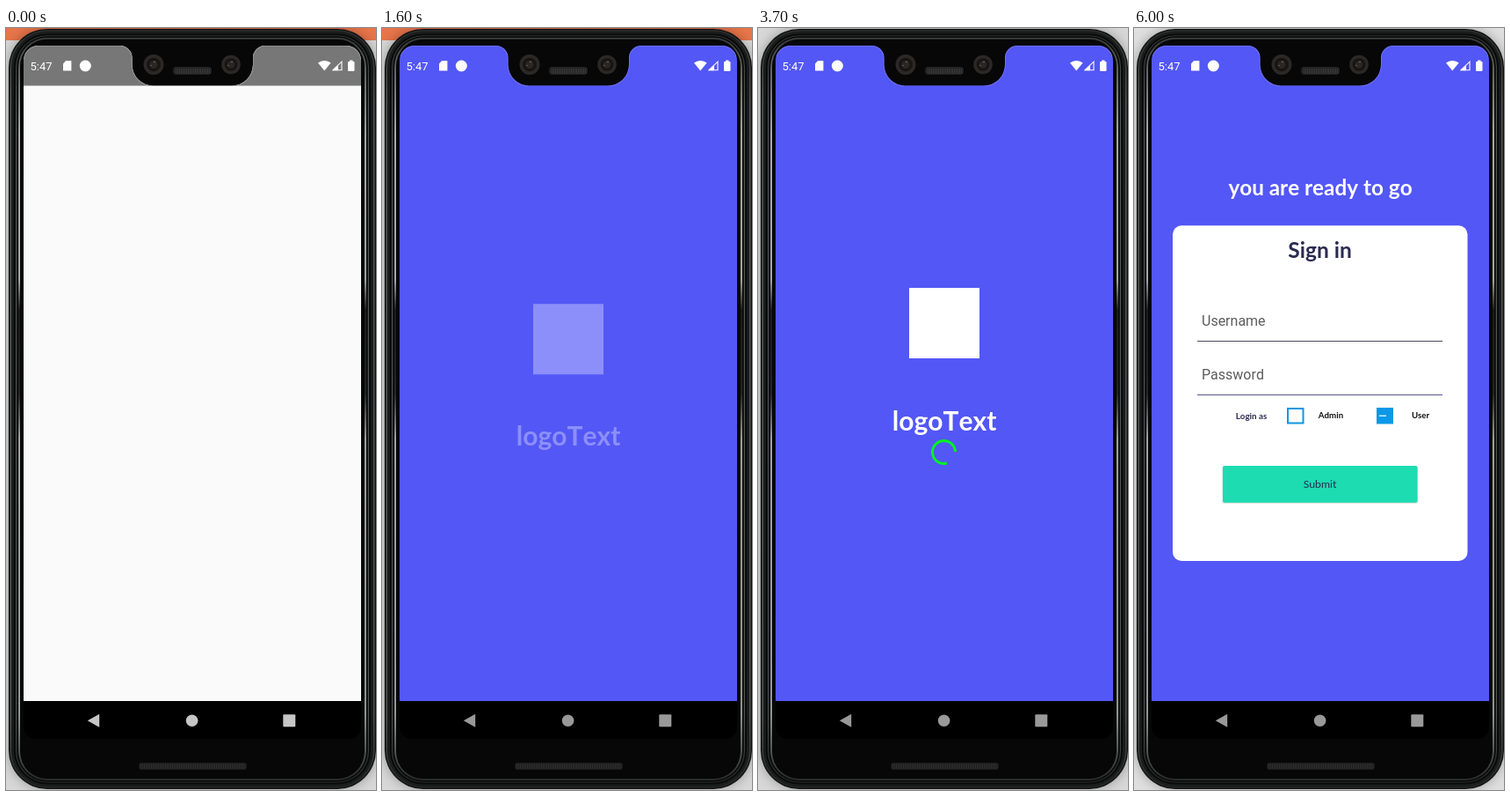
An HTML page with a canvas for the animation above (6300 ms loop, 421x865 px).

```html
<!DOCTYPE html>
<html lang="en">
<head>
<meta charset="utf-8">
<title>Splash to sign in</title>
<style>
  html, body { margin: 0; width: 100%; height: 100%; overflow: hidden; background: #d8d8d8; }
  canvas { display: block; width: 421px; height: 865px; }
</style>
</head>
<body>
<canvas id="stage"></canvas>
<script>
const W = 421, H = 865, LOOP = 6300;
const BLUE = '#5357f5', INK = '#2b2b52', SKY = '#0c98e6';
const GEO = 'Lato, sans-serif', ROBOTO = 'Roboto, sans-serif';

const canvas = document.getElementById('stage');
const ratio = window.devicePixelRatio || 1;
canvas.width = W * ratio;
canvas.height = H * ratio;
const c = canvas.getContext('2d');
c.scale(ratio, ratio);
c.fontKerning = 'none';

const clamp = v => Math.min(1, Math.max(0, v));
const lerp = (a, b, k) => a + (b - a) * k;
const ease = k => k * k * (3 - 2 * k);

// Linear interpolation through rows of [time, ...values].
function track(rows, t) {
  let i = 0;
  while (i < rows.length - 2 && t >= rows[i + 1][0]) i++;
  const a = rows[i], b = rows[i + 1];
  const k = clamp((t - a[0]) / (b[0] - a[0]));
  return a.slice(1).map((v, j) => lerp(v, b[j + 1], k));
}

function box(x, y, w, h, fill, r = 0) {
  c.fillStyle = fill;
  c.beginPath();
  c.roundRect(x, y, w, h, r);
  c.fill();
}

function disc(x, y, r, fill) {
  c.fillStyle = fill;
  c.beginPath();
  c.arc(x, y, r, 0, Math.PI * 2);
  c.fill();
}

function poly(points, fill) {
  c.fillStyle = fill;
  c.beginPath();
  points.forEach(p => c.lineTo(...p));
  c.closePath();
  c.fill();
}

function text(str, x, y, font, fill, align = 'left') {
  c.font = font;
  c.fillStyle = fill;
  c.textAlign = align;
  c.fillText(str, x, y);
}

function vertical(stops) {
  const g = c.createLinearGradient(0, 0, 0, H);
  stops.forEach(([at, color]) => g.addColorStop(at, color));
  return g;
}

const shine = vertical([
  [0, '#2c2e2e'], [0.06, '#6d7070'], [0.14, '#b8baba'], [0.33, '#b4b6b6'],
  [0.37, '#1c1d1d'], [0.48, '#262828'], [0.54, '#b0b2b2'],
  [0.9, '#a0a3a3'], [0.96, '#484b4b'], [1, '#202121']
]);
const rim = vertical([[0, '#2a2b2b'], [0.1, '#565959'], [0.9, '#525555'], [1, '#222']]);

function desk(t) {
  box(0, 0, W, H, t < 6000 ? '#d8d8d8' : '#e0e0e0');
  c.globalAlpha = 1 - clamp((t - 1900) / 500);
  box(0, 0, W, 14, '#e8754a');
  c.globalAlpha = 1;
}

function body() {
  c.save();
  c.shadowColor = 'rgba(0,0,0,.3)';
  c.shadowBlur = 14 * ratio;
  box(3, 1, 418, 863, '#101111', 44);
  c.restore();

  const layers = [
    [1.5, rim], [3, '#1b1d1d'], [6, '#090909'],
    [8, rim], [9.2, '#0c0c0c'], [11.2, shine], [13, '#070707']
  ];
  for (const [d, fill] of layers) {
    box(3 + d, 1 + d * 0.9, 418 - 2 * d, 863 - d * 1.8, fill, 44 - d);
  }
  box(20, 764, 384, 43, '#000', [0, 0, 14, 14]);
  box(151, 834, 123, 8, '#1c1c1c', 3);
  for (let x = 153; x < 273; x += 2) box(x, 835, 1, 6, '#303030');
}

function screenPath() {
  c.beginPath();
  c.moveTo(20, 764);
  c.arcTo(20, 20, 212, 20, 17);
  c.arcTo(143.5, 20, 143.5, 65.5, 14);
  c.arcTo(143.5, 65.5, 212, 65.5, 24);
  c.arcTo(281, 65.5, 281, 20, 24);
  c.arcTo(281, 20, 404, 20, 14);
  c.arcTo(404, 20, 404, 764, 17);
  c.lineTo(404, 764);
  c.closePath();
}

function screen(blue) {
  c.save();
  screenPath();
  c.clip();
  box(20, 20, 384, 744, blue ? BLUE : '#fafafa');
  if (!blue) box(20, 20, 384, 45.5, '#777');
  // Faint glint along the top edge and the notch
  c.beginPath();
  c.rect(21, 20, 382, 46);
  c.clip();
  screenPath();
  c.strokeStyle = blue ? 'rgba(150,153,255,.5)' : 'rgba(180,180,180,.5)';
  c.lineWidth = 1.6;
  c.stroke();
  c.restore();
}

function camera(x, y, r) {
  disc(x, y, r, '#2b2825');
  disc(x, y, r * 0.68, '#171513');
  disc(x, y, r * 0.4, '#2a2622');
  disc(x + 1, y - 3, 0.8, '#8a857c');
  disc(x - 3, y + 1, 0.8, '#6d675f');
}

function notch() {
  camera(168, 41.5, 11.5);
  camera(256, 41.5, 10.8);
  box(190, 44, 44, 9, '#222', 4);
  for (let x = 193; x < 232; x += 2) box(x, 46, 1, 6, '#3b3b3b');
}

function statusBar() {
  const white = '#fff';
  text('5:47', 27.5, 47.8, '13px ' + ROBOTO, white);
  poly([[68, 37.2], [74.4, 37.2], [74.4, 48.4], [65, 48.4], [65, 40.4]], white);
  disc(90.3, 43, 6.5, white);

  c.fillStyle = white;
  c.beginPath();
  c.moveTo(362.3, 48.5);
  c.lineTo(355, 39.5);
  c.quadraticCurveTo(362.3, 34.5, 369.7, 39.5);
  c.closePath();
  c.fill();

  c.strokeStyle = white;
  c.lineWidth = 1.1;
  c.beginPath();
  c.moveTo(372.2, 47.7);
  c.lineTo(382, 47.7);
  c.lineTo(382, 38.2);
  c.closePath();
  c.stroke();
  poly([[371, 48.2], [378, 48.2], [378, 41.6]], white);

  box(389, 38, 7.5, 11, white, 1);
  box(391, 36.6, 3.5, 2, white);
}

function navBar(t) {
  const fill = t < 200 ? '#c6c6c6' : t < 500 ? '#b0b0b0' : '#999';
  poly([[92.8, 786.3], [106.2, 778.8], [106.2, 793.8]], fill);
  disc(211.6, 786.3, 6.8, fill);
  box(315.3, 779.2, 14, 14, fill, 1);
}

const DROP = [[1300, -8], [1500, 0], [1600, 1.2], [2000, 0.6], [2400, 0]];
// Time, tail and head angle in degrees
const SPIN = [
  [3100, -75, -50], [3400, 0, 170], [3700, 75, 358], [3800, 185, 374],
  [3900, 295, 390], [4100, 417, 447], [4300, 460, 485], [4500, 472, 608]
];

function splash(t) {
  const step = Math.floor(t / 100) * 100;
  const lift = 17 * ease(clamp((step - 3000) / 700));
  const [drop] = track(DROP, step);

  c.globalAlpha = clamp((step - 1200) / 1200);
  box(172, 312 + drop - lift, 80, 80, '#fff');
  text('logoText', 212, 473.8 - lift, '700 30px ' + GEO, '#fff', 'center');
  c.globalAlpha = 1;

  if (t < 3100) return;
  const tick = step < 4000 ? step : Math.max(3900, Math.floor((step - 100) / 200) * 200 + 100);
  const [tail, head] = track(SPIN, tick);
  c.strokeStyle = '#00f51e';
  c.lineWidth = 3;
  c.beginPath();
  c.arc(211.5, 481.5, 13, tail * Math.PI / 180, head * Math.PI / 180);
  c.stroke();
}

function field(label, y, line) {
  text(label, 77, y, '16px ' + ROBOTO, '#5c5c5c');
  box(72, y + 17, 279, 1, line);
}

function signIn() {
  text('you are ready to go', 212, 190.3, '700 24.3px ' + GEO, '#fff', 'center');
  box(44, 224.3, 335.5, 380.7, '#fff', 10);
  text('Sign in', 211.5, 260.5, '700 24.5px ' + GEO, INK, 'center');
  field('Username', 338, '#4a4a5c');
  field('Password', 399, '#55558c');

  text('Login as', 133.5, 443.8, '700 9.8px ' + GEO, INK, 'center');
  c.strokeStyle = SKY;
  c.lineWidth = 2;
  c.strokeRect(175, 432, 17.5, 16.5);
  text('Admin', 224, 443.3, '700 9.7px ' + GEO, '#111', 'center');
  box(276, 431, 19, 18.5, SKY);
  box(279, 439.6, 8, 1.2, '#fff');
  text('User', 326, 443.3, '700 9.7px ' + GEO, '#111', 'center');

  box(100.5, 497.5, 222.5, 42.2, '#d5dedb', 2);
  box(101, 497, 221.5, 41.8, '#1ddcb1', 2);
  text('Submit', 211.5, 521.8, '500 12.2px ' + GEO, '#27365a', 'center');
}

function draw(t) {
  desk(t);
  body();
  screen(t >= 900);
  notch();
  statusBar();
  navBar(t);
  if (t >= 4700) signIn();
  else if (t >= 1300) splash(t);
}

const start = performance.now();
function loop() {
  draw((performance.now() - start) % LOOP);
  requestAnimationFrame(loop);
}
loop();
</script>
</body>
</html>
```
